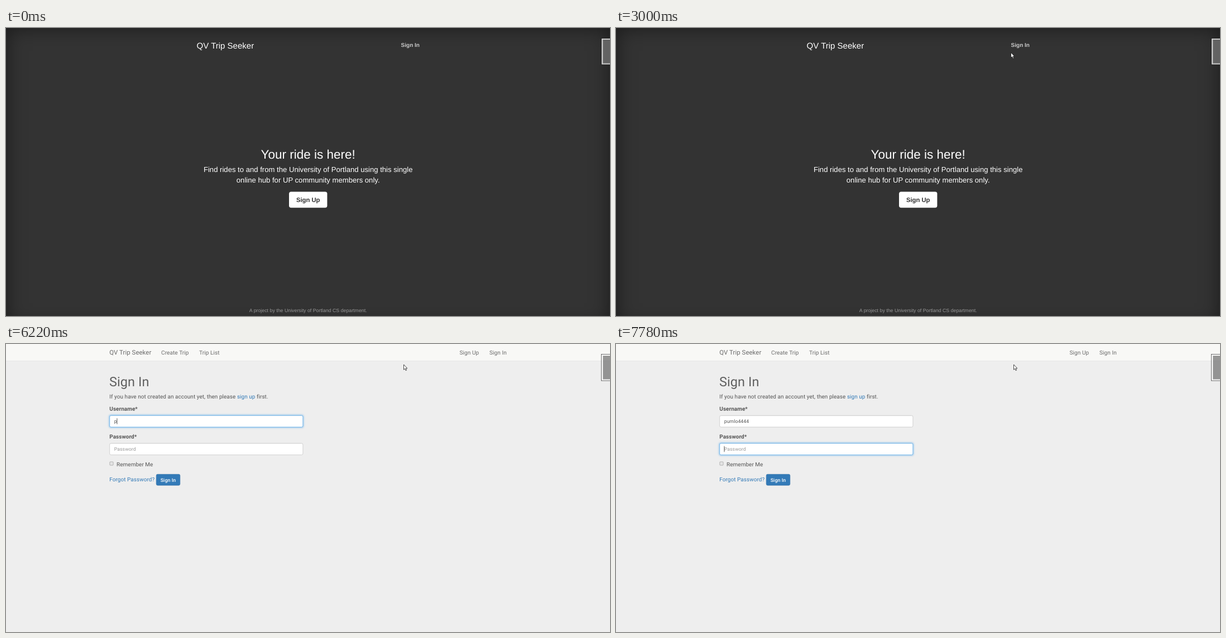
An HTML page for the animation above (8000 ms loop, 1082 by 518 pixels).

```html
<!DOCTYPE html>
<html lang="en">
<head>
<meta charset="utf-8">
<title>Ride sign-in</title>
<style>
  html, body { margin: 0; width: 100%; height: 100%; overflow: hidden; background: #eee; }
  #shade { position: absolute; left: 0; top: 0; width: 1082px; height: 535px;
    background: #333; box-shadow: inset 0 0 34px rgba(0, 0, 0, .5); }
  svg { position: absolute; left: 0; top: 0; display: block; }
  text { white-space: pre; text-rendering: geometricPrecision; }
  #cover { font-family: "Liberation Sans", Arial, sans-serif; fill: #fff; }
  #cover .mid { text-anchor: middle; }
  .bold { font-weight: 700; }
  #form { font: 9.95px Roboto, sans-serif; letter-spacing: .062px; fill: #555; }
  #form .nav { font-size: 10.1px; fill: #6c6c6c; }
  #form .link { fill: #337ab7; }
  #form .small { font-size: 8.68px; }
  #form .hint { fill: #999; }
  .box { fill: #fff; }
  #list text { font: 700 6.5px "Open Sans", sans-serif; letter-spacing: 0; fill: #111; }
</style>
</head>
<body>
<div id="shade"></div>
<svg width="1082" height="518" viewBox="0 0 1082 518">
  <defs>
    <filter id="glow" x="-5%" y="-60%" width="110%" height="220%">
      <feGaussianBlur stdDeviation="1.8"/>
    </filter>
  </defs>

  <g id="cover">
    <text x="341.6" y="37.4" font-size="15">QV Trip Seeker</text>
    <text class="bold" x="707.6" y="34.1" font-size="10" fill="#ccc">Sign In</text>
    <rect id="underline" x="708" y="44.7" width="33" height="1.2" fill="#666"/>
    <text class="mid" x="541.2" y="235" font-size="22.5">Your ride is here!</text>
    <g class="mid" font-size="13.11">
      <text x="541.2" y="259.3">Find rides to and from the University of Portland using this single</text>
      <text x="541.2" y="277.5">online hub for UP community members only.</text>
    </g>
    <rect x="507" y="294.6" width="68.4" height="28.6" rx="3.7"/>
    <text class="mid bold" x="541.2" y="313" font-size="11.25" fill="#333">Sign Up</text>
    <text class="mid" x="541.2" y="511" font-size="8.8" fill="#999">A project by the University of Portland CS department.</text>
  </g>

  <g id="form">
    <rect width="1082" height="518" fill="#eee"/>
    <rect width="1082" height="30" fill="#f8f8f6"/>
    <rect y="30" width="1082" height=".8" fill="#e5e5e5"/>
    <g class="nav">
      <text x="185.3" y="19" font-size="11.4">QV Trip Seeker</text>
      <text x="278" y="18.7">Create Trip</text>
      <text x="346" y="18.7">Trip List</text>
      <text x="812.4" y="18.7">Sign Up</text>
      <text x="866" y="18.7">Sign In</text>
    </g>
    <text x="185" y="76" font-size="23.5" fill="#606060">Sign In</text>
    <text x="185.3" y="98">If you have not created an account yet, then please <tspan class="link">sign up</tspan> first.</text>
    <text class="bold" x="185.3" y="120.3">Username*</text>
    <text class="bold" x="185.3" y="170.3">Password*</text>
    <g id="userBox"></g>
    <g id="passBox"></g>
    <text id="user" class="small" x="193.8" y="142.1"></text>
    <text class="small hint" x="193.8" y="192.1">Password</text>
    <rect id="caret" width=".8" height="10.6" fill="#333"/>
    <rect x="185.9" y="211.9" width="6.2" height="6.2" rx="1" fill="#e4e4e4" stroke="#a5a5a5" stroke-width=".8"/>
    <text x="198" y="220.4">Remember Me</text>
    <text class="link" x="185.3" y="247">Forgot Password?</text>
    <rect x="269.2" y="234.3" width="42.6" height="19.9" rx="2.4" fill="#337ab7" stroke="#2e6da4" stroke-width=".6"/>
    <text x="290.5" y="247.6" font-size="8.9" font-weight="500" text-anchor="middle" fill="#fff">Sign In</text>
    <g id="list">
      <rect id="listBox" x="185.5" y="150.2" width="346.5" fill="#fff" stroke="#c4c4c4" stroke-width=".8"/>
    </g>
  </g>

  <g id="handle" opacity=".75">
    <rect x="1066.5" y="18.5" width="30" height="47.5" fill="#fff" stroke="#111" stroke-width=".8"/>
    <rect x="1069.3" y="21" width="30" height="42.5" fill="#777"/>
  </g>

  <g id="cursor" stroke="#111" stroke-width=".75" stroke-linejoin="round" fill="#fff">
    <path id="arrow" d="M0 0V9.2L2.1 7.3L3.6 10.7L5.1 10L3.6 6.8H6.4Z"/>
    <path id="hand" d="M-1 8V1a1 1 0 0 1 2 0V4.8Q2 4 2.8 5Q3.8 4.4 4.5 5.4Q6 5.2 6 6.8V9.2L5 12.5H-.4L-3.2 8.2Q-3.6 6.4-2.2 6.8Z"/>
  </g>
</svg>
<script>
  const LOOP = 8000, TICK = 46.6;
  const $ = id => document.getElementById(id);
  const NS = "http://www.w3.org/2000/svg";
  const show = (id, on) => { $(id).style.display = on ? "" : "none"; };
  const clamp = x => Math.max(0, Math.min(1, x));
  const ease = x => x * x * (3 - 2 * x);
  const mix = (a, b, k) => a + (b - a) * k;

  function add(parent, tag, attrs) {
    const el = document.createElementNS(NS, tag);
    for (const key in attrs) el.setAttribute(key, attrs[key]);
    return parent.appendChild(el);
  }

  // Text input whose blue focus ring can fade
  function field(id, y) {
    const frame = { x: 185.7, y, width: 346.2, height: 20.8, rx: 2.4 };
    const glow = add($(id), "rect", { ...frame, fill: "none", stroke: "#66afe9", "stroke-width": 3, filter: "url(#glow)" });
    const box = add($(id), "rect", { ...frame, class: "box", "stroke-width": .9 });
    add($(id), "rect", { x: 186.4, y: y + .5, width: 344.8, height: .6, fill: "#000", opacity: .06 });
    return k => {
      glow.setAttribute("opacity", .6 * k);
      box.setAttribute("stroke", `rgb(${mix(204, 102, k)},${mix(204, 175, k)},${mix(204, 233, k)})`);
    };
  }
  const focusUser = field("userBox", 128.6);
  const focusPass = field("passBox", 178.6);

  // Pointer route: time, x, y
  const route = [
    [930, 1008, 514], [1000, 962, 490], [1140, 860, 440], [1330, 675, 372],
    [1430, 610, 338], [1540, 579, 302], [1710, 546.5, 272.5], [1900, 565, 240],
    [2050, 598, 186], [2188, 629.8, 126], [2330, 662, 96], [2520, 688, 67.3],
    [2750, 696, 58], [3000, 708.5, 43], [3140, 712.5, 37]
  ];
  function pointer(t) {
    const q = 930 + Math.floor((t - 930) / TICK) * TICK;
    const i = route.findIndex(p => p[0] > q);
    if (i < 0) return route[route.length - 1].slice(1);
    if (i === 0) return route[0].slice(1);
    const [a, b] = [route[i - 1], route[i]];
    const k = (q - a[0]) / (b[0] - a[0]);
    return [mix(a[1], b[1], k), mix(a[2], b[2], k)];
  }

  const NAME = "pumlo4444";
  const keyTimes = [6220, 6350, 6440, 6530, 6730, 6860, 7040, 7190, 7340];
  const rows = [NAME, "pumlo44", "pebble7"].map((label, i) => {
    const el = add($("list"), "text", { x: 190.4, y: 159.4 + 13.8 * i });
    el.textContent = label;
    return el;
  });
  function rowCount(t) {
    if (t < 6270 || t >= 7650) return 0;
    return t < 6350 ? 3 : t < 7190 ? 2 : 1;
  }

  function drawForm(t) {
    const typed = keyTimes.filter(k => t >= k).length;
    const user = $("user");
    user.textContent = typed ? NAME.slice(0, typed) : "Username";
    user.classList.toggle("hint", !typed);

    const toPass = ease(clamp((t - 7630) / 150));
    focusUser(t < 7650 ? ease(clamp((t - 4600) / 130)) : 1 - toPass);
    focusPass(t < 7650 ? 0 : toPass);

    const inPass = t >= 7650;
    const width = typed && !inPass ? user.getComputedTextLength() : 0;
    show("caret", t >= 4660);
    $("caret").setAttribute("x", 193.6 + width);
    $("caret").setAttribute("y", inPass ? 183.6 : 133.6);

    const count = rowCount(t);
    show("list", count > 0);
    $("listBox").setAttribute("height", count * 13.8 + .4);
    rows.forEach((row, i) => { row.style.display = i < count ? "" : "none"; });
  }

  function draw(t) {
    const loaded = t >= 4560;
    const [x, y] = pointer(t);
    const hover = t >= 930 && x >= 708 && y <= 45;
    const hand = (hover && t < 4380) || (t >= 4740 && t < 4920);

    show("shade", !loaded);
    show("cover", !loaded);
    show("form", loaded);
    show("underline", hover);
    show("handle", !loaded || t >= 4660);
    show("cursor", t >= 930);
    show("arrow", !hand);
    show("hand", hand);
    $("cursor").setAttribute("transform", `translate(${x} ${y})`);
    $("cursor").setAttribute("stroke", loaded && t < 4660 ? "#3f8a3a" : "#111");
    if (loaded) drawForm(t);
  }

  const start = performance.now();
  function loop() {
    draw((performance.now() - start) % LOOP);
    requestAnimationFrame(loop);
  }
  loop();
</script>
</body>
</html>
```
